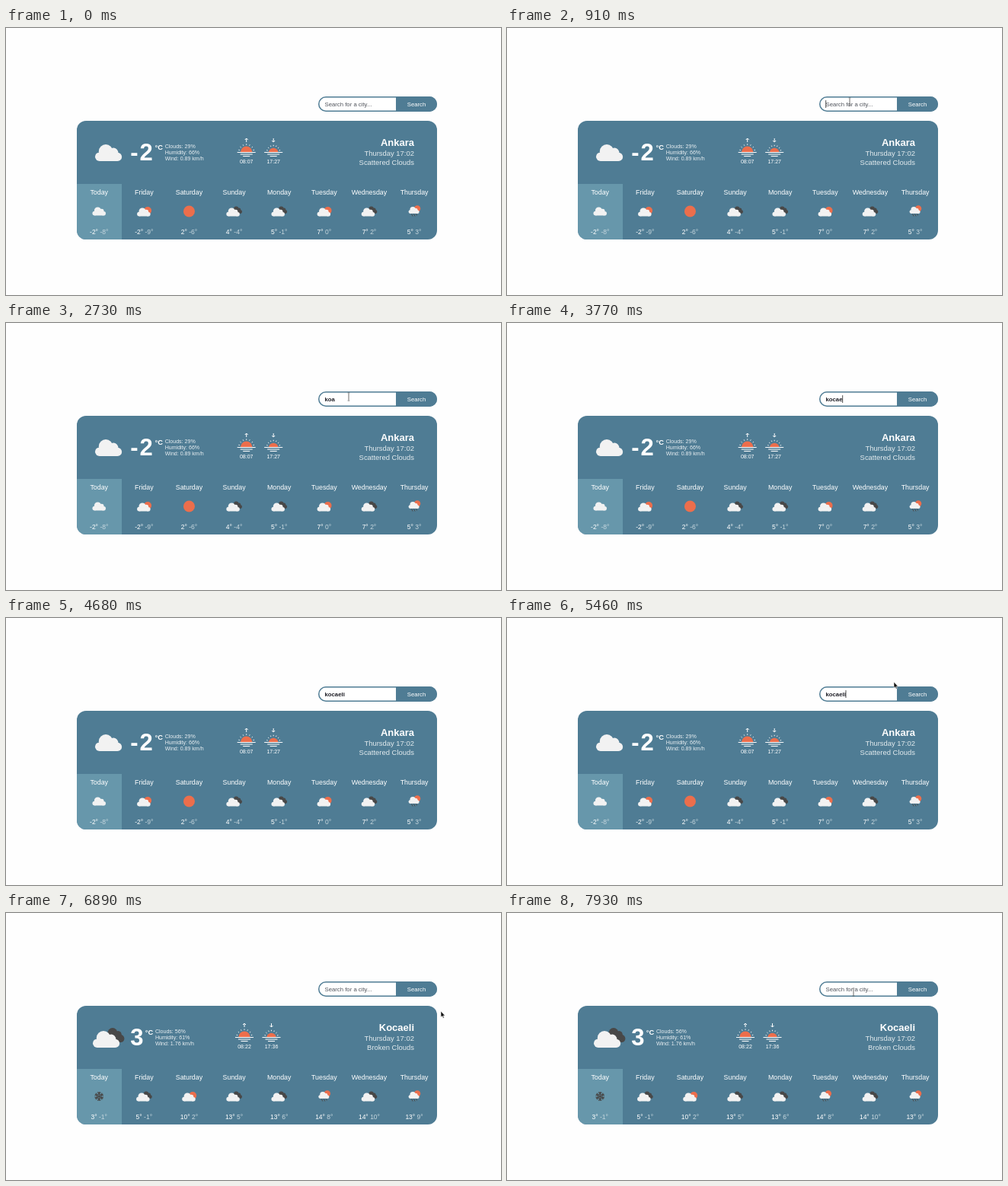
Recreate the animation shown at these times as an HTML page. Size 650x351 px, loop 8000 ms.

```html
<!DOCTYPE html>
<html lang="en">
<head>
<meta charset="utf-8">
<title>Weather</title>
<style>
  html, body { margin: 0; width: 100%; height: 100%; overflow: hidden; background: #fefefe; }
  svg { display: block; width: 650px; height: 351px; font-family: "Liberation Sans", Arial, sans-serif; }
  .blue { fill: #4f7c94; }
  .light, #button.hover { fill: #6797ab; }
  .card text, .label { fill: #fff; }
  .mid { text-anchor: middle; }
  .day { font-size: 8.85px; }
  .temp { font-size: 8.5px; }
  .temp .low { fill: #c8d8df; }
  .small, .detail { font-size: 7.05px; }
  .card .detail { fill: #e9eff2; }
  .field { font-size: 7.75px; }
  .place { text-anchor: end; font-size: 9.45px; }
  .place .city { font-size: 13px; font-weight: bold; }
  .card .place .soft { fill: #e3ebee; }
  .degrees { font-size: 31px; font-weight: bold; }
  .unit { font-size: 9.3px; font-weight: bold; }
  .line { fill: none; stroke: #fff; stroke-width: 1; }
</style>
</head>
<body>
<svg viewBox="0 0 650 351">
  <defs>
    <clipPath id="cardClip"><rect x="93" y="122" width="473" height="156" rx="12"/></clipPath>
    <clipPath id="horizon"><rect x="-14" y="-14" width="28" height="14"/></clipPath>
    <g id="cloud">
      <circle cx="-11.7" cy="5.2" r="5.8"/><circle cx="-3.5" cy="-1.8" r="9.2"/>
      <circle cx="6.6" cy="-.2" r="6.2"/><circle cx="12" cy="5.4" r="5.6"/>
      <rect x="-11.7" y="1" width="23.7" height="10"/>
    </g>
    <g id="scattered" fill="#f2f2f2"><use href="#cloud"/></g>
    <g id="clear"><circle r="15" fill="#ec6e4c"/></g>
    <g id="few">
      <circle cx="9.5" cy="-2" r="10" fill="#ec6e4c"/>
      <use href="#cloud" transform="translate(-1 2)" fill="#f2f2f2"/>
    </g>
    <g id="broken">
      <use href="#cloud" transform="translate(8 -3.5) scale(.73 .86)" fill="#484848"/>
      <use href="#cloud" transform="translate(-3 2)" fill="#f2f2f2"/>
    </g>
    <g id="rain">
      <circle cx="8" cy="-7" r="8.4" fill="#ec6e4c"/>
      <use href="#cloud" transform="translate(-1 -3) scale(.8)" fill="#f2f2f2"/>
      <path d="M-7 7l3 6M-1 7l3 6M5 7l2 4" stroke="#484848" stroke-width="2"/>
    </g>
    <g id="snow" fill="none" stroke="#484848" stroke-width="2.2">
      <g id="flakeArm"><path d="M0-12V12M-4-11l4 4 4-4M-4 11l4-4 4 4"/></g>
      <use href="#flakeArm" transform="rotate(60)"/><use href="#flakeArm" transform="rotate(120)"/>
      <circle r="6"/>
    </g>
    <g id="lines" class="line"><path d="M-12 .5H12M-8 3H8M-4.5 5.5H4.5"/></g>
  </defs>

  <rect class="blue" x="410" y="90" width="156" height="20" rx="10"/>
  <path d="M512 91.5H420a8.5 8.5 0 0 0 0 17H512z" fill="#fff"/>
  <path id="button" class="blue" d="M512 90H556a10 10 0 0 1 0 20H512z"/>
  <text class="field label mid" x="539" y="103">Search</text>
  <text id="query" class="field" x="418.5" y="103"></text>
  <path id="caret" d="M0 95V105" stroke="#222" stroke-width=".8"/>

  <g id="cards"></g>

  <g id="cursor">
    <path id="arrow" d="M0 0V8L1.8 6.4 3 9.2 4.3 8.6 3.1 6H5.5z" fill="#111" stroke="#fff" stroke-width=".6"/>
    <path id="hand" d="M-1.5-4.5Q-.6-5.2-.2-4.2L.5-1.8 3.3-1.2Q4.5-.8 4.2 1L3.5 4.5H-.5L-3 1Q-3-.3-1.5.4L-2-3.5z" fill="#fff" stroke="#333" stroke-width=".8"/>
    <path id="beam" d="M-1.3-5H1.3M0-4V4M-1.3 5H1.3" fill="none" stroke="#444" stroke-width=".8"/>
  </g>
</svg>
<script>
const LOOP = 8000, STEP = 130;
const DAYS = ['Today', 'Friday', 'Saturday', 'Sunday', 'Monday', 'Tuesday', 'Wednesday', 'Thursday'];
const $ = id => document.getElementById(id);

const reports = [
  { city: 'Ankara', time: '17:02', sky: 'Scattered Clouds', degrees: '-2', unitX: 195.5, sunX: 315.7,
    details: ['Clouds: 29%', 'Humidity: 66%', 'Wind: 0.89 km/h'], rise: '08:07', set: '17:27',
    icons: 'scattered few clear broken broken few broken rain',
    temps: '-2/-8 -2/-9 2/-6 4/-4 5/-1 7/0 7/2 5/3' },
  { city: 'Kocaeli', time: '17:02', sky: 'Broken Clouds', degrees: '3', unitX: 182.7, sunX: 313,
    details: ['Clouds: 56%', 'Humidity: 61%', 'Wind: 1.76 km/h'], rise: '08:22', set: '17:36',
    icons: 'scattered broken few broken broken rain broken rain',
    temps: '3/-1 5/-1 10/2 13/5 13/6 14/8 14/10 13/9' }
];

function sun(x, label, rising) {
  const radius = rising ? 7.6 : 6.2, drop = rising ? 0 : 1;
  let rays = '';
  for (let a = 15; a < 180; a += 25) {
    const c = Math.cos(a * Math.PI / 180), s = -Math.sin(a * Math.PI / 180);
    rays += `M${c * (radius + 1.6)} ${s * (radius + 1.6)}L${c * (radius + 3)} ${s * (radius + 3)}`;
  }
  const arrow = rising ? 'M0-13V-18M-2-16L0-18 2-16' : 'M0-18V-13M-2-15L0-13 2-15';
  return `<g transform="translate(${x} 163)">
    <g clip-path="url(#horizon)"><circle cy="${drop}" r="${radius}" fill="#ec6e4c"/></g>
    <path class="line" d="${rays}${arrow}"/><use href="#lines"/>
    <text class="small mid" y="14.8">${label}</text></g>`;
}

function card(r, i) {
  const icons = r.icons.split(' ');
  const days = r.temps.split(' ').map((pair, n) => {
    const [high, low] = pair.split('/'), x = 122.2 + n * 59.125;
    return `<text class="day mid" x="${x}" y="219">${DAYS[n]}</text>
      <use id="icon${i}-${n}" href="#${icons[n]}" transform="translate(${x} 241) scale(.5)"/>
      <text class="temp mid" x="${x}" y="271">${high}° <tspan class="low">${low}°</tspan></text>`;
  }).join('');
  const details = r.details.map((d, n) =>
    `<text class="detail" x="${r.unitX + 13.2}" y="${157.8 + n * 8.1}">${d}</text>`).join('');
  const negative = r.degrees[0] === '-';
  return `<g class="card" id="card${i}" clip-path="url(#cardClip)">
    <rect class="blue" x="93" y="122" width="473" height="156"/>
    <rect class="light" x="93" y="205" width="59" height="73"/>
    <use id="main${i}" href="#scattered" transform="translate(134.5 164)"/>
    <text class="degrees" x="163.3" y="174">${negative ? '-' : ''}<tspan x="${negative ? 175.5 : 163.3}">${r.degrees.slice(-1)}</tspan></text>
    <text class="unit" x="${r.unitX}" y="160">°C</text>${details}
    ${sun(r.sunX, r.rise, true)}${sun(r.sunX + 35.5, r.set, false)}
    <g class="place"><text class="city" x="536" y="155">${r.city}</text>
      <text class="soft" x="536" y="167.8">Thursday ${r.time}</text>
      <text class="soft" x="536" y="180.3">${r.sky}</text></g>
    ${days}</g>`;
}
$('cards').innerHTML = reports.map(card).join('');

const typing = [[0, ''], [1950, 'k'], [2080, 'ko'], [2210, 'koa'], [2860, 'ko'], [3250, 'koc'],
  [3380, 'koca'], [3770, 'kocae'], [3900, 'kocael'], [4160, 'kocaeli'], [5980, '']];

// Pointer stops: time, x, y
const moves = [[260, 385, 331], [390, 392, 284], [520, 412, 210], [650, 434, 140], [780, 447, 104], [910, 450, 97],
  [4940, 450, 97], [5070, 455, 92], [5200, 470, 78], [5330, 490, 74], [5460, 508, 84], [5590, 518, 96],
  [5720, 520, 99], [6240, 520, 99], [6370, 528, 104], [6500, 546, 112], [6630, 560, 121], [6760, 569, 127],
  [6890, 571, 129], [7410, 571, 129], [7540, 552, 124], [7670, 510, 113], [7800, 470, 106], [7930, 455, 104]];

const show = (id, on) => $(id).style.display = on ? '' : 'none';
const latest = (list, t) => list.filter(item => item[0] <= t).pop();

function pointer(t) {
  const [start, x, y] = latest(moves, t);
  const next = moves.find(m => m[0] > t);
  if (!next) return [x, y];
  const k = (t - start) / (next[0] - start);
  return [x + (next[1] - x) * k, y + (next[2] - y) * k];
}

function render(now) {
  const t = Math.floor(now % LOOP / STEP) * STEP;

  const [typedAt, text] = latest(typing, t);
  const query = $('query');
  query.textContent = text || 'Search for a city...';
  query.setAttribute('fill', text ? '#1c1c24' : '#50545c');
  query.setAttribute('font-weight', text ? 'bold' : 'normal');
  const focused = t >= 910 && t < 5980;
  const blinkStart = text ? typedAt : 910;
  show('caret', focused && Math.floor((t - blinkStart) / 520) % 2 === 0);
  $('caret').setAttribute('transform', `translate(${418.7 + (text ? query.getComputedTextLength() : 0)} 0)`);

  const loaded = t >= 5980;
  show('card0', !loaded);
  show('card1', loaded);
  $('main1').setAttribute('href', t >= 6110 ? '#broken' : '#scattered');
  $('icon1-0').setAttribute('href', t >= 6110 ? '#snow' : '#scattered');

  const visible = t >= 260 && !(t >= 2860 && t < 5070);
  show('cursor', visible);
  let hover = false;
  if (visible) {
    const [x, y] = pointer(t);
    const inBar = y > 90 && y < 110;
    hover = inBar && x >= 512 && x < 566;
    const overText = inBar && x > 411 && x < 512;
    $('cursor').setAttribute('transform', `translate(${x} ${y})`);
    show('hand', hover);
    show('beam', overText);
    show('arrow', !hover && !overText);
  }
  $('button').classList.toggle('hover', hover);
}

const begin = performance.now();
function tick() {
  render(performance.now() - begin);
  requestAnimationFrame(tick);
}
tick();
</script>
</body>
</html>
```
